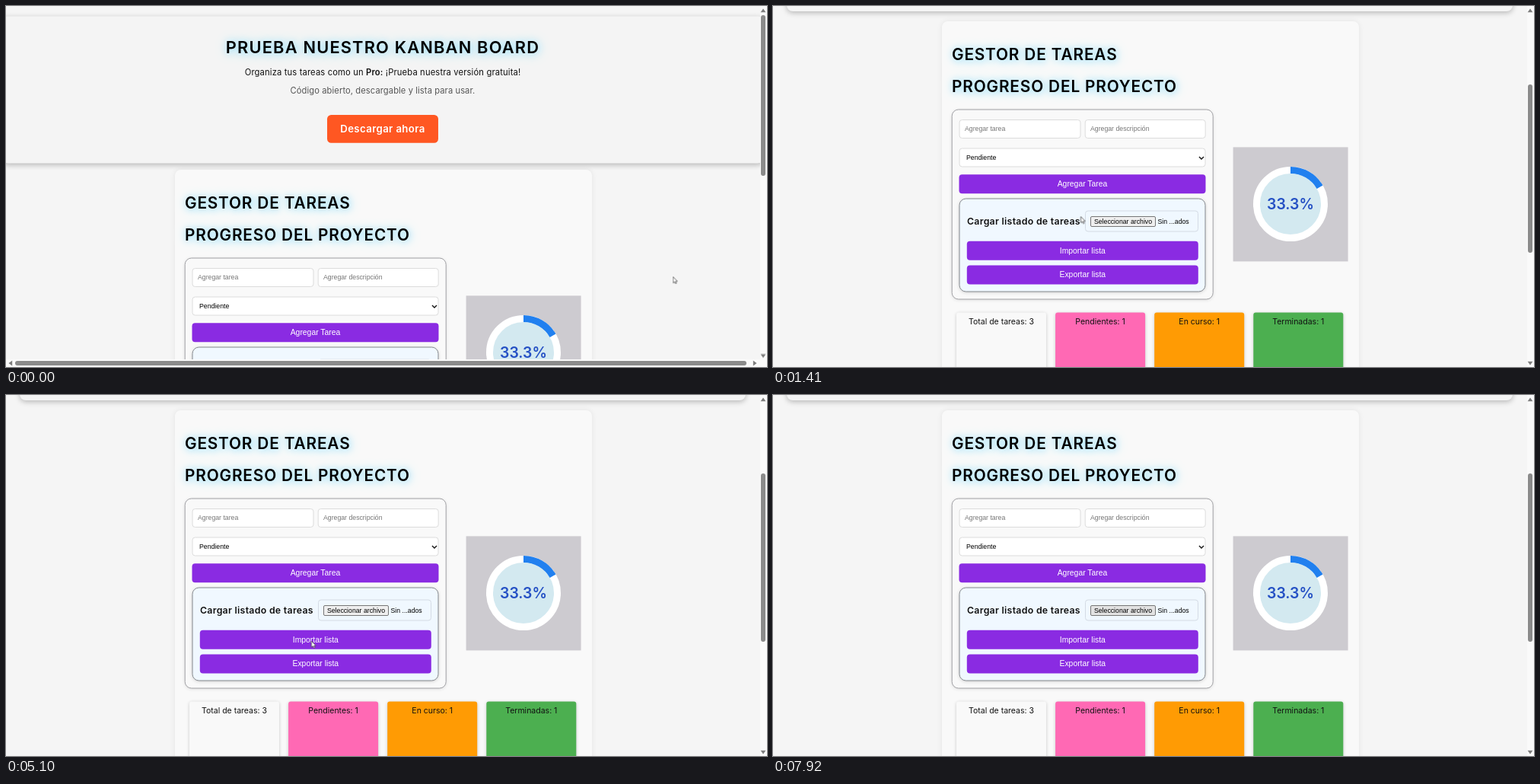
Write an HTML page that moves like this. It is 1000x474 px and loops after 8 s.

```html
<!DOCTYPE html>
<html lang="es">
<head>
<meta charset="utf-8">
<title>Gestor de tareas</title>
<style>
html, body { margin: 0; width: 100%; height: 100%; overflow: hidden; background: #f5f5f5; }
#stage { position: relative; width: 1000px; height: 474px; overflow: hidden; background: #f5f5f5; }
#stage div { position: absolute; left: 0; top: 0; box-sizing: border-box; white-space: nowrap; }
#stage svg { position: absolute; overflow: visible; }
#page { width: 991px; height: 760px; }
.inter { font-family: Inter, sans-serif; color: #111; }
.sans { font-family: "Liberation Sans", Arial, sans-serif; font-size: 8.73px; color: #000; }
.center { text-align: center; }
.heading { font-size: 20.8px; font-weight: 600; letter-spacing: .85px; color: #000; text-shadow: 1px 1px 9px #9fe3fb, 1px 1px 15px #a6e6fc; }
.title { letter-spacing: 1.12px; }
.lead { font-size: 10.7px; letter-spacing: .13px; }
.lead b { font-weight: 600; }
.note { font-size: 10.6px; letter-spacing: .1px; color: #555; }
.banner { background: #f4f4f4; border-radius: 8px; box-shadow: 0 2px 7px rgba(0,0,0,.26); }
.download { background: #ff5722; border-radius: 5px; color: #fff; font-size: 12.6px; font-weight: 600; letter-spacing: .35px; }
.panel { background: #f9f9f9; border-radius: 8px; box-shadow: 0 0 7px rgba(0,0,0,.08); }
.form { background: #f9f9f9; border: 1px solid #a0a0a4; border-radius: 9px; box-shadow: 0 1px 4px rgba(0,0,0,.1); }
.loader { background: #f0f8ff; border: 1px solid #85898e; border-radius: 9px; box-shadow: 0 1px 4px rgba(0,0,0,.15); }
.field { background: #fff; border: 1px solid #dcdcdc; border-radius: 4px; }
.hint { color: #757575; }
.action { background: #8a2be2; border-radius: 4px; color: #fff; font-size: 10.4px; }
.file { border: 1px solid #d4dbe4; border-radius: 4px; }
.choose { background: #efefef; border: 1px solid #767676; border-radius: 2px; }
.focus { border: 2px solid #101010; border-radius: 4px; }
.caret { background: #222; }
.label { font-size: 12.3px; font-weight: 600; letter-spacing: .3px; }
.chart { background: #cdcbd0; }
.percent { font-size: 19.4px; font-weight: 600; color: #2450c4; }
.card { border-radius: 3px; box-shadow: 0 1px 4px rgba(0,0,0,.2); }
.count { font-size: 10.5px; }
.track { background: #fafafa; }
.thumb { background: #8b8b8b; border-radius: 3px; }
</style>
</head>
<body>
<div id="stage"><div id="page"></div></div>
<script>
const LOOP = 8000;
const stage = document.getElementById('stage');
const page = document.getElementById('page');

// Placed with translate, so that fractions of a pixel keep soft edges.
function box(parent, x, y, w, h, cls, text = '') {
  const el = document.createElement('div');
  el.className = cls;
  el.innerHTML = text;
  Object.assign(el.style, { translate: `${x}px ${y}px`, width: w + 'px', height: h + 'px', lineHeight: h + 'px' });
  parent.append(el);
  return el;
}

// One line of text; y is the middle of the capitals.
const line = (parent, x, y, w, cls, text) => box(parent, x, y - 15, w, 30, cls, text);

function drawing(parent, x, y, shapes) {
  const svg = document.createElementNS('http://www.w3.org/2000/svg', 'svg');
  svg.setAttribute('width', 10);
  svg.setAttribute('height', 10);
  svg.style.left = x + 'px';
  svg.style.top = y + 'px';
  svg.innerHTML = shapes;
  parent.append(svg);
  return svg;
}

// Steps are [ms, properties, easing towards the next step].
function play(el, steps) {
  const frames = steps.map(([ms, props, easing = 'linear']) => ({ offset: ms / LOOP, easing, ...props }));
  frames.push({ ...frames[frames.length - 1], offset: 1 });
  return el.animate(frames, { duration: LOOP, iterations: Infinity });
}

// Shows an element only between the given times.
function showBetween(el, from, to) {
  const steps = [[0, { opacity: from > 0 ? 0 : 1 }, 'step-end']];
  if (from > 0) steps.push([from, { opacity: 1 }, 'step-end']);
  steps.push([to, { opacity: 0 }, 'step-end']);
  play(el, steps);
}

// Banner
const banner = box(page, 18, 17, 954, 184, 'banner');
line(banner, 0, 39.3, 954, 'inter heading title center', 'PRUEBA NUESTRO KANBAN BOARD');
line(banner, 0, 71, 954, 'inter lead center', 'Organiza tus tareas como un <b>Pro:</b> ¡Prueba nuestra versión gratuita!');
line(banner, 0, 94, 954, 'inter note center', 'Código abierto, descargable y lista para usar.');
box(banner, 407.5, 123.4, 139, 35, 'inter download center', 'Descargar ahora');

// Task form
box(page, 222, 214, 547.5, 560, 'panel');
line(page, 235, 257.5, 400, 'inter heading', 'GESTOR DE TAREAS');
line(page, 235, 300, 400, 'inter heading', 'PROGRESO DEL PROYECTO');
box(page, 234.7, 329.5, 344, 250, 'form');
box(page, 244.5, 343, 160, 25, 'field');
line(page, 252, 355.3, 140, 'sans hint', 'Agregar tarea');
box(page, 409.7, 343, 159, 25, 'field');
line(page, 417, 355.3, 140, 'sans hint', 'Agregar descripción');
const focus = box(page, 409.7, 343, 159, 25, 'focus');
box(focus, 5.5, 5, 1, 11, 'caret');
box(page, 244.5, 380.5, 324, 25, 'field');
line(page, 254, 393.3, 140, 'sans', 'Pendiente');
drawing(page, 559.5, 391.5, '<path d="M0 0l3 3 3-3" fill="none" stroke="#111" stroke-width="1.4"/>');
box(page, 244.5, 415.3, 324, 25, 'sans action center', 'Agregar Tarea');

// List loader
box(page, 244.5, 446.5, 324, 123, 'loader');
line(page, 255, 476.7, 160, 'inter label', 'Cargar listado de tareas');
box(page, 410, 462.5, 149, 28, 'file');
const choose = box(page, 417, 470, 86, 14, 'choose');
line(page, 417, 476.7, 86, 'sans center', 'Seleccionar archivo');
line(page, 505.5, 476.7, 50, 'sans', 'Sin ...ados');
box(page, 254.8, 502.8, 304, 25, 'sans action center', 'Importar lista');
box(page, 254.8, 534.4, 304, 25, 'sans action center', 'Exportar lista');

// Progress ring
box(page, 604.6, 379.4, 151, 150, 'chart');
const radius = 44.5, angle = Math.PI / 3;
drawing(page, 680.3, 454.2, `
  <circle r="${radius}" fill="#d3e9f0" stroke="#fff" stroke-width="9"/>
  <path d="M0 ${-radius}A${radius} ${radius} 0 0 1 ${radius * Math.sin(angle)} ${-radius * Math.cos(angle)}"
    fill="none" stroke="#2180ef" stroke-width="9"/>`);
line(page, 605, 454.2, 150, 'inter percent center', '33.3%');

// Counters
[['Total de tareas: 3', '#f9f9f9'], ['Pendientes: 1', '#ff69b4'], ['En curso: 1', '#ff9b04'], ['Terminadas: 1', '#4caf50']]
  .forEach(([text, color], i) => {
    const x = 241 + i * 130.1;
    box(page, x, 596.4, 118, 130, 'card').style.background = color;
    line(page, x, 609, 118, 'inter count center', text);
  });

// Scrollbars
const arrow = (parent, x, y, turn) =>
  drawing(parent, x, y, `<path d="M0-2.5L3.4 2.2H-3.4z" fill="#7d7d7d" transform="rotate(${turn})"/>`);
box(stage, 991, 0, 9, 474, 'track');
const thumb = box(stage, 992, 0, 6, 221, 'thumb');
arrow(stage, 995, 6, 0);
const downArrow = arrow(stage, 995, 468.5, 180);
const bottomBar = box(stage, 0, 464, 1000, 10, 'track');
box(bottomBar, 12, 2, 961, 6, 'thumb');
arrow(bottomBar, 6, 5, -90);
arrow(bottomBar, 984, 5, 90);

const cursor = drawing(stage, 0, 0,
  '<path d="M0 0V8.2L2 6.5 3.3 9.3 4.6 8.7 3.4 6H5.8z" fill="#fff" stroke="#444" stroke-width=".8" stroke-linejoin="round"/>');

// Motion
const shift = y => ({ transform: `translateY(${y}px)` });
const scale = s => ({ transform: `scale(${s})` });
play(page, [[0, shift(1), 'step-end'], [330, shift(0)], [1250, shift(0), 'ease-in-out'], [1400, shift(-194)]]);
play(banner, [[0, scale(1.05)], [220, scale(1.05), 'ease'], [540, scale(1)]]);
play(thumb, [
  [0, { top: '12px', height: '211px' }, 'step-end'],
  [330, { top: '12px', height: '221px' }],
  [1250, { top: '12px', height: '221px' }, 'ease-in-out'],
  [1400, { top: '103px', height: '221px' }]
]);
play(downArrow, [[0, shift(-9.5), 'step-end'], [330, shift(0)]]);
showBetween(bottomBar, 0, 330);
showBetween(focus, 2390, 3400);
showBetween(cursor, 0, 7540);
play(choose, [[0, { background: '#efefef' }, 'step-end'], [5880, { background: '#e2e2e2' }]]);

const path = [
  [0, 876, 355], [100, 876, 355], [1130, 417, 286], [1250, 417, 286], [1410, 404, 276],
  [1600, 400, 262], [2030, 335, 163], [2180, 335, 163], [2390, 452, 162], [2600, 450, 163],
  [2880, 383, 208], [3270, 385, 212], [3700, 380, 232], [4130, 339, 270], [4500, 340, 275],
  [5000, 400, 320], [5500, 410, 350], [6050, 467, 285], [7540, 466, 284]
];
play(cursor, path.map(([ms, x, y]) => [ms, { transform: `translate(${x + .5}px, ${y + .5}px)` }, 'ease-in-out']));
</script>
</body>
</html>
```
